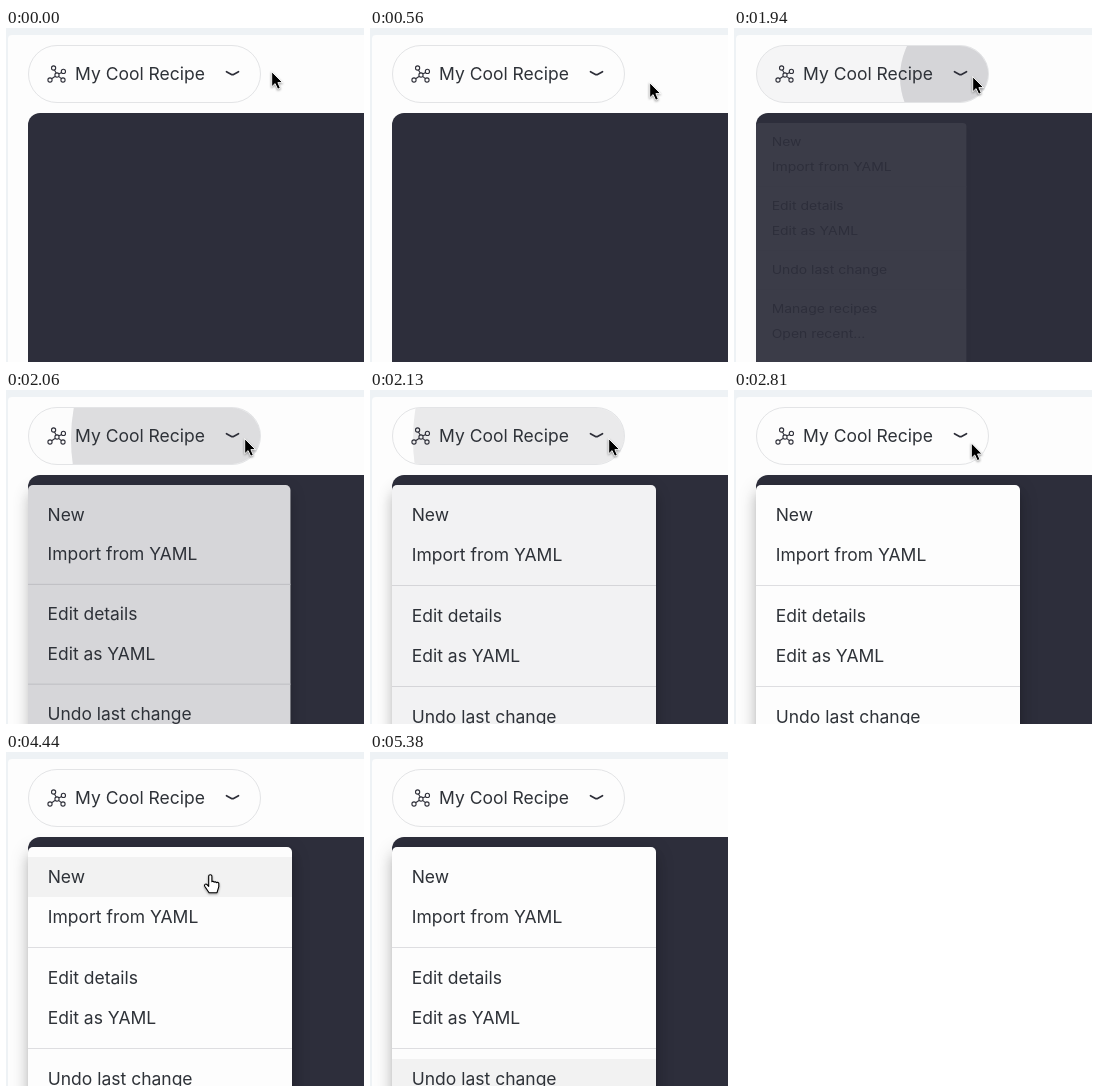
An HTML page that plays this animation: 358 px wide and 334 px high, repeating every 5950 ms.

```html
<!DOCTYPE html>
<html lang="en">
<head>
<meta charset="utf-8">
<title>Recipe menu</title>
<style>
  html, body { margin: 0; width: 100%; height: 100%; overflow: hidden; }
  body { background: #eef2f5; font: 17.5px Inter, sans-serif; color: #2e3238; }
  #stage { position: relative; width: 358px; height: 334px; overflow: hidden; }
  #stage > * { position: absolute; box-sizing: border-box; }
  #panel { left: 2px; top: 7px; right: 0; bottom: 0; background: #fdfdfd; border-radius: 4px 0 0; }
  #canvas { left: 22px; top: 85px; width: 400px; height: 300px; background: #2d2e3b; border-radius: 12px; }
  #pill { left: 22px; top: 17px; width: 233px; height: 58px; border-radius: 29px; overflow: hidden;
    border: 1px solid #e3e4e6; }
  #pill span { position: absolute; left: 46px; line-height: 56px; white-space: nowrap; }
  #ripple { position: absolute; left: 215px; top: 31px; width: 0; height: 0; border-radius: 50%; background: #2d2e3b; }
  #menu { left: 22px; top: 95px; width: 264px; height: 420px; padding-top: 10px; background: #fdfdfd;
    border-radius: 5px; transform-origin: 0 0;
    box-shadow: 0 6px 6px -4px #0003, 0 10px 12px 1px #00000024, 0 4px 18px 2px #0000001f; }
  #menu div { height: 40px; line-height: 40px; padding-left: 19.7px; white-space: nowrap; }
  #menu hr { height: 1px; margin: 10px 0; border: 0; background: #dedee1; }
  svg { left: 0; top: 0; overflow: visible; fill: none; stroke: #2d2e38; stroke-linecap: round; stroke-linejoin: round; }
  #pointer { filter: drop-shadow(0 1px 1px #0006); }
</style>
</head>
<body>
<div id="stage">
  <div id="panel"></div>
  <div id="canvas"></div>
  <div id="pill"><i id="ripple"></i><span>My Cool Recipe</span></div>
  <svg width="358" height="334">
    <path id="icon" stroke-width="1.1"/>
    <path stroke-width="1.7" d="M220.5 43.7l4.5 2.5q1.5 .8 3 0l4.5-2.5"/>
  </svg>
  <div id="menu">
    <div>New</div><div>Import from YAML</div><hr>
    <div>Edit details</div><div>Edit as YAML</div><hr>
    <div>Undo last change</div><hr>
    <div>Manage recipes</div><div>Open recent...</div>
  </div>
  <svg width="358" height="334">
    <g id="pointer">
      <path id="arrow" fill="#000" stroke="#fff" stroke-width=".9"
        d="M.7 0v14.8l3.4-3.2 2.6 5.6 2.6-1.1-2.4-5.5h4.3z"/>
      <path id="hand" fill="#fff" stroke="#000" stroke-width="1.1"
        d="M-1.6 10V1.6a1.6 1.6 0 0 1 3.2 0V7a1.5 1.5 0 0 1 2.3 .5a1.5 1.5 0 0 1 2.3 .5a1.5 1.5 0 0 1 2.3 .5V12l-1.8 6H-1.2l-4.4-6.5a1.4 1.4 0 0 1 2.2-1.7l1.8 1.8z"/>
    </g>
  </svg>
</div>
<script>
const LOOP = 5950, STEP = 62.5;
const HOVER = 1440, PRESS = 1780, RELEASE = 1888;
const RADIUS = 218;

// Pointer glides: start, end, x, y
const glides = [
  [0, 190, 277, 71], [340, 565, 279, 55], [1060, 1660, 238, 49],
  [2680, 3250, 211, 136], [3250, 3380, 220, 130], [3600, 3880, 183, 126],
  [3880, 4130, 194, 123], [4200, 4440, 204.3, 122.7], [4890, 5380, 207, 340]
];

const $ = id => document.getElementById(id);
const [pill, ripple, menu, pointer, arrow, hand] =
  ['pill', 'ripple', 'menu', 'pointer', 'arrow', 'hand'].map($);
const rows = [...menu.querySelectorAll('div')];
const tops = rows.map(row => 95 + row.offsetTop);

const progress = (t, start, duration) => Math.min(1, Math.max(0, (t - start) / duration));

// cubic-bezier(.4, 0, .2, 1) by bisection
function ease(t, start, duration) {
  const x = progress(t, start, duration);
  let lo = 0, hi = 1;
  for (let i = 0; i < 20; i++) {
    const u = (lo + hi) / 2, v = 1 - u;
    if (1.2 * v * v * u + .6 * v * u * u + u ** 3 < x) lo = u; else hi = u;
  }
  return lo * lo * (3 - 2 * lo);
}

const easeInOut = k => k < .5 ? 4 * k ** 3 : 1 - 4 * (1 - k) ** 3;

function pointAt(t) {
  let x = 265, y = 44;
  for (const [start, end, toX, toY] of glides) {
    const k = easeInOut(progress(t, start, end - start));
    x += (toX - x) * k;
    y += (toY - y) * k;
  }
  return [x, y];
}

// A hub ring joined by trimmed spokes to four outer rings
function drawIcon() {
  const r = 2.1, hub = [51, 47];
  const ring = ([x, y]) => `M${x - r} ${y}a${r} ${r} 0 1 1 ${2 * r} 0a${r} ${r} 0 1 1 ${-2 * r} 0`;
  let d = ring(hub);
  for (const [dx, dy] of [[-3.4, -7], [6.4, -3.6], [-7, 5], [6, 5]]) {
    const trim = r / Math.hypot(dx, dy);
    const at = k => [hub[0] + dx * k, hub[1] + dy * k];
    d += ring(at(1)) + `M${at(trim)}L${at(1 - trim)}`;
  }
  $('icon').setAttribute('d', d);
}

function draw(now) {
  const t = Math.floor((now % LOOP + 3) / STEP) * STEP;
  const open = t > RELEASE;

  const [x, y] = pointAt(t);
  const over = open ? tops.findIndex(top => y >= top && y < top + 40) : -1;
  rows.forEach((row, i) => row.style.background = i === over ? '#f2f2f2' : '');
  pointer.setAttribute('transform', `translate(${x} ${y})`);
  arrow.style.display = over < 0 ? '' : 'none';
  hand.style.display = over < 0 ? 'none' : '';

  const hover = ease(t, HOVER, 250) - ease(t, RELEASE, 250);
  pill.style.background = `rgba(45,46,59,${.04 * hover})`;

  const spread = ease(t, PRESS, 550);
  ripple.style.padding = RADIUS * spread + 'px';
  ripple.style.margin = -RADIUS * spread + 'px';
  ripple.style.opacity = (.1 + .2 * spread) * (1 - ease(t, RELEASE, 550));

  const scale = .75 + .25 * ease(t, RELEASE, 217);
  menu.style.transform = scale > .9999 ? 'none' : `scale(${scale}, ${scale * scale})`;
  menu.style.opacity = ease(t, RELEASE, 327);
  menu.style.visibility = open ? 'visible' : 'hidden';
}

drawIcon();
const begin = performance.now();
(function tick() {
  draw(performance.now() - begin);
  requestAnimationFrame(tick);
})();
</script>
</body>
</html>
```
